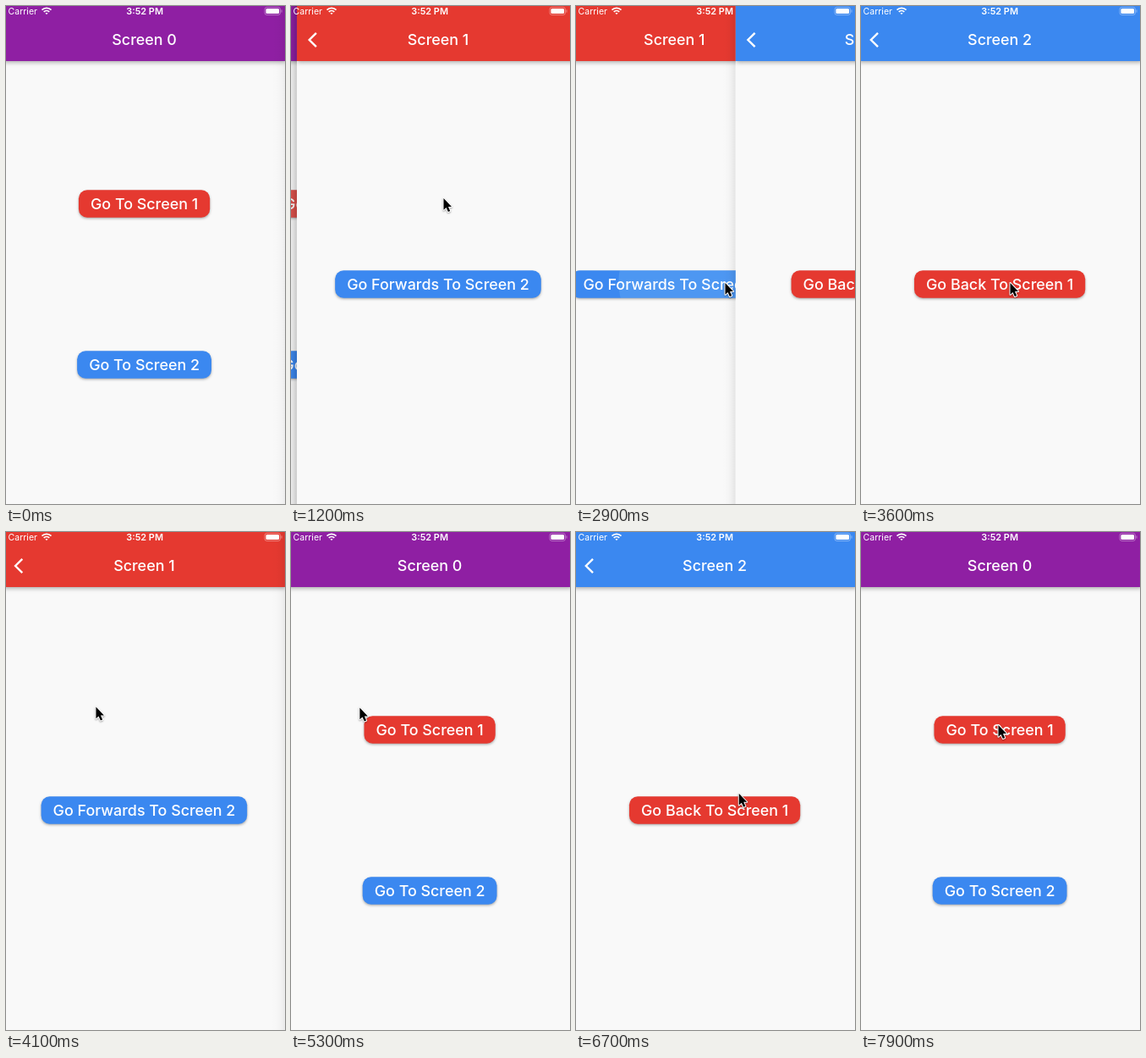
Animation, 330 px wide and 588 px high, one loop 8 s. Source, as an HTML page with a canvas:

```html
<!DOCTYPE html>
<html lang="en">
<head>
<meta charset="utf-8">
<title>Screen navigation</title>
<style>
html, body { margin: 0; width: 100%; height: 100%; overflow: hidden; background: #f9f9f9; }
canvas { display: block; }
</style>
</head>
<body>
<canvas id="stage" width="330" height="588"></canvas>
<script>
const ctx = document.getElementById('stage').getContext('2d');
const LOOP = 8000, SLIDE = 400, TAP_DELAY = 115, POINTER_PACE = 3.4, POINTER_SHOWS = 100;
const HEIGHT = 588, LEFT = -3, PAGE = 335, CENTER = 164.1;
const RED = '#e53930', BLUE = '#3b88f0', PURPLE = '#8f1fa3';

const screens = [
  { color: PURPLE, buttons: [
    { label: 'Go To Screen 1', y: 233.5, fill: RED },
    { label: 'Go To Screen 2', y: 423.5, fill: BLUE }] },
  { color: RED, buttons: [{ label: 'Go Forwards To Screen 2', y: 328.5, fill: BLUE }] },
  { color: BLUE, buttons: [{ label: 'Go Back To Screen 1', y: 328.5, fill: RED }] },
];

// Where the pointer arrives and when; a tap there opens the screen `to`.
const stops = [
  { t: -475, x: 16, y: 42, to: 0 },
  { t: 820, x: 180, y: 226, to: 1 },
  { t: 2720, x: 176, y: 326, to: 2 },
  { t: 3635, x: 175, y: 325, to: 1 },
  { t: 4735, x: 12, y: 43, to: 0 },
  { t: 6050, x: 172, y: 423, to: 2 },
  { t: 6700, x: 193, y: 309 },
  { t: 6935, x: 16, y: 42, to: 0 },
  { t: 7900, x: 162, y: 227 },
];
const taps = stops.filter(stop => 'to' in stop);
taps.forEach((tap, i) => tap.from = i ? taps[i - 1].to : 1);

const clamp = v => Math.max(0, Math.min(1, v));

// cubic-bezier(.35, .91, .33, .97)
function ease(x) {
  if (x <= 0 || x >= 1) return clamp(x);
  const curve = (u, a, b) => 3 * u * (1 - u) ** 2 * a + 3 * u * u * (1 - u) * b + u ** 3;
  let lo = 0, hi = 1;
  for (let i = 0; i < 24; i++) {
    const mid = (lo + hi) / 2;
    if (curve(mid, .35, .33) < x) lo = mid; else hi = mid;
  }
  return curve(lo, .91, .97);
}

function setFont(size, weight) {
  ctx.font = `${weight} ${size}px Inter, sans-serif`;
}

function text(str, x, y, align = 'center') {
  ctx.textAlign = align;
  ctx.fillStyle = '#fff';
  ctx.fillText(str, x, y);
}

function shadow(alpha, blur, dy) {
  ctx.shadowColor = `rgba(0,0,0,${alpha})`;
  ctx.shadowBlur = blur;
  ctx.shadowOffsetY = dy;
}

function drawRipples(id, buttonY, t) {
  for (const { t: start, from, x, y } of taps) {
    const age = t - start;
    if (from !== id || Math.abs(y - buttonY) > 16 || age < 0 || age > 700) continue;
    ctx.fillStyle = `rgba(180,240,255,${.14 * clamp(age / 75) * clamp((700 - age) / 350)})`;
    ctx.beginPath();
    ctx.arc(x, y, age * .43, 0, 7);
    ctx.fill();
  }
}

function drawButton(id, { label, y, fill }, t) {
  const width = ctx.measureText(label).width + 28;
  ctx.save();
  ctx.beginPath();
  ctx.roundRect(CENTER - width / 2, y - 16.2, width, 32.4, 10);
  shadow(.32, 3, 1.4);
  ctx.fillStyle = fill;
  ctx.fill();
  shadow(0, 0, 0);
  ctx.clip();
  drawRipples(id, y, t);
  text(label, CENTER, y + 6.4);
  ctx.restore();
}

function drawScreen(id, dx, t) {
  const { color, buttons } = screens[id];
  ctx.save();
  ctx.translate(dx, 0);
  ctx.beginPath();
  ctx.rect(LEFT, 0, PAGE, HEIGHT);
  ctx.clip();
  ctx.fillStyle = '#f9f9f9';
  ctx.fillRect(LEFT, 0, PAGE, HEIGHT);

  shadow(.34, 5, 1.6);
  ctx.fillStyle = color;
  ctx.fillRect(LEFT, -10, PAGE, 75);
  shadow(0, 0, 0);
  setFont(17.9, 500);
  text('Screen ' + id, CENTER, 46.2);
  if (id) {
    ctx.strokeStyle = '#fff';
    ctx.lineWidth = 2.4;
    ctx.beginPath();
    ctx.moveTo(20, 31.8);
    ctx.lineTo(11.8, 40);
    ctx.lineTo(20, 48.2);
    ctx.stroke();
  }
  buttons.forEach(button => drawButton(id, button, t));
  ctx.restore();
}

function drawEdgeShadow(x, strength) {
  const width = PAGE * .05, g = ctx.createLinearGradient(x - width, 0, x, 0);
  for (let p = 0; p <= 1; p += .25) {
    g.addColorStop(p, `rgba(0,0,0,${.2 * p ** 2.3 * strength})`);
  }
  ctx.fillStyle = g;
  ctx.fillRect(x - width, 0, width, HEIGHT);
}

function drawStatusBar() {
  setFont(10.5, 400);
  text('Carrier', 2.6, 10, 'left');
  setFont(10.9, 600);
  text('3:52 PM', CENTER, 10);
  ctx.strokeStyle = '#fff';
  ctx.lineWidth = 1.8;
  for (const r of [1.4, 4.6, 7.8]) {
    ctx.beginPath();
    ctx.arc(48, 10.2, r, -Math.PI * .75, -Math.PI * .25);
    ctx.stroke();
  }

  ctx.strokeStyle = ctx.fillStyle = 'rgba(255,255,255,.35)';
  ctx.lineWidth = 1;
  ctx.beginPath();
  ctx.roundRect(306, 1.5, 18.5, 9, 2.6);
  ctx.stroke();
  ctx.fillRect(325.4, 4.4, 1.2, 3.2);
  ctx.fillStyle = '#fff';
  ctx.beginPath();
  ctx.roundRect(307.4, 2.9, 15.7, 6.2, 1.5);
  ctx.fill();
}

// The pointer rests, then travels at a steady pace to be on time for the next stop.
function pointerAt(t) {
  const next = stops.findIndex(stop => stop.t > t);
  if (next < 0) return stops.at(-1);
  const a = stops[next - 1], b = stops[next];
  const time = Math.min(b.t - a.t, Math.hypot(b.x - a.x, b.y - a.y) * POINTER_PACE);
  const k = clamp(1 - (b.t - t) / time);
  return { x: a.x + (b.x - a.x) * k, y: a.y + (b.y - a.y) * k };
}

const arrow = new Path2D('M.5 1V14.7L3.6 11.9 5.9 17 8.2 16 6 11H10Z');

function drawPointer(t) {
  if (t < POINTER_SHOWS) return;
  const { x, y } = pointerAt(t);
  ctx.save();
  ctx.translate(x, y);
  ctx.lineJoin = 'round';
  ctx.lineWidth = 2;
  ctx.strokeStyle = '#fff';
  shadow(.35, 2, 1);
  ctx.stroke(arrow);
  shadow(0, 0, 0);
  ctx.fillStyle = '#000';
  ctx.fill(arrow);
  ctx.restore();
}

function draw(t) {
  const { t: tapped, from, to } = taps.findLast(tap => tap.t + TAP_DELAY <= t);
  const s = clamp((t - tapped - TAP_DELAY) / SLIDE);
  const push = to > from;
  const cover = push ? ease(s) : 1 - ease(s);
  const x = PAGE * (1 - cover);
  drawScreen(Math.min(from, to), -PAGE * cover / 3, t);
  if (cover > 0) {
    drawEdgeShadow(LEFT + x, ease(push ? s : 1 - s));
    drawScreen(Math.max(from, to), x, t);
  }
  drawStatusBar();
  drawPointer(t);
}

function frame() {
  draw(performance.now() % LOOP);
  requestAnimationFrame(frame);
}
frame();
</script>
</body>
</html>
```
